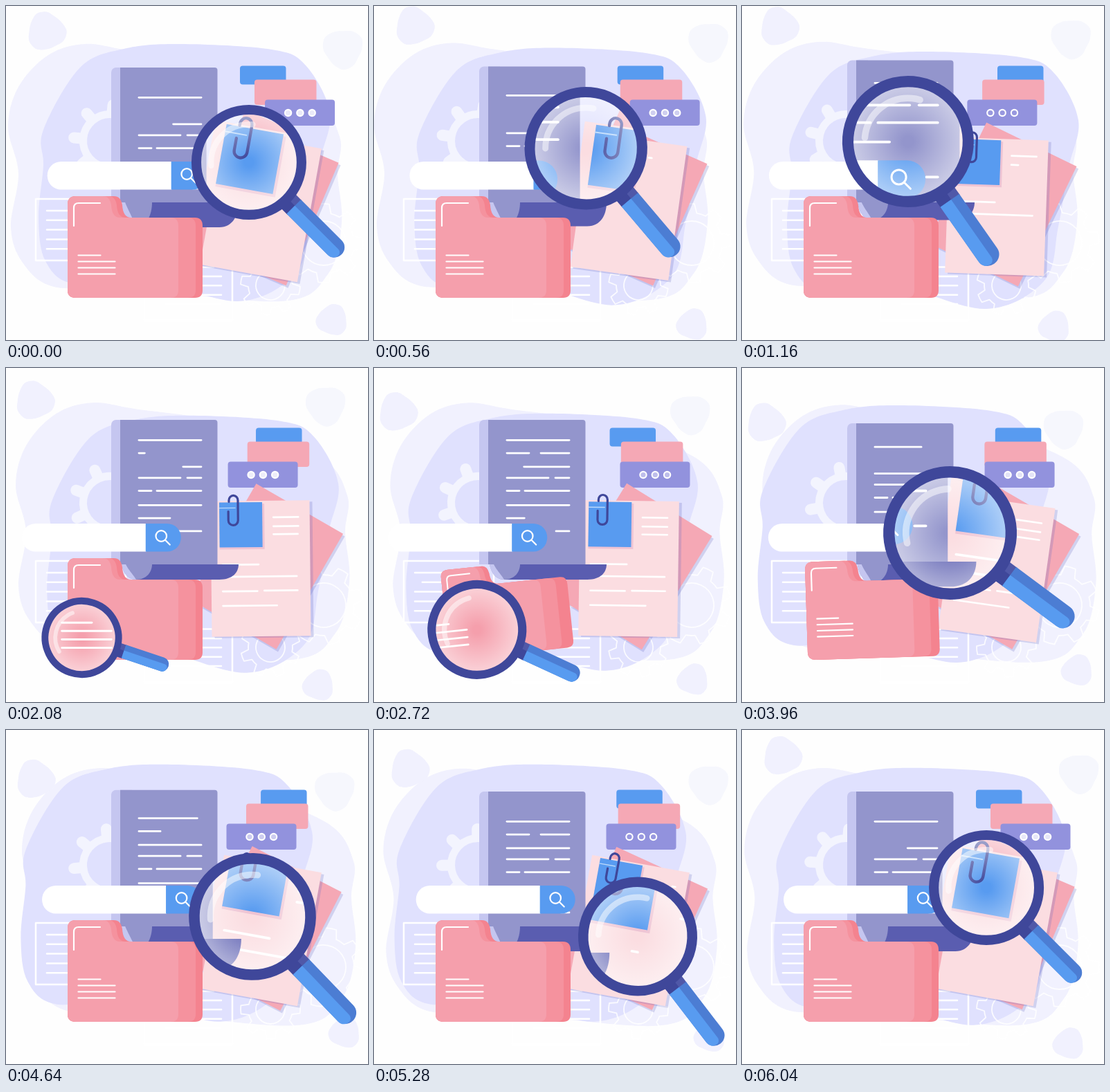
An HTML page with a canvas that plays this animation: 523x483 px, repeating every 6.08 s.

```html
<!DOCTYPE html>
<html lang="en">
<head>
<meta charset="utf-8">
<title>Document search</title>
<style>
html, body { margin: 0; width: 100%; height: 100%; overflow: hidden; background: #fefefe; }
canvas { display: block; }
</style>
</head>
<body>
<canvas id="stage" width="523" height="483"></canvas>
<script>
const g = document.getElementById('stage').getContext('2d');
const LOOP = 6080, TAU = Math.PI * 2, RAD = Math.PI / 180;
const BLUE = '#589bf0', NAVY = '#3f479a', PAGE = '#9395cc', LILAC = '#c5c6f0', PINK = '#f5a8b5';
let t = 0;

// Timing rules: an eased step, a step out and back, and a looping cosine.
const clamp = v => Math.min(1, Math.max(0, v));
function rise(from, to, time = t) {
  const u = clamp((time - from) / (to - from));
  return u * u * (3 - 2 * u);
}
const swing = (a, b, c, d, time) => rise(a, b, time) - rise(c, d, time);
const wave = (deg, turns = 1) => Math.cos(TAU * turns * t / LOOP + deg * RAD);

// Smooth looping curve through one column of the stops, flat at extremes.
function follow(stops, col) {
  const n = stops.length;
  const time = i => stops[(i + n) % n][0] + Math.floor(i / n) * LOOP;
  const val = i => stops[(i + n) % n][col];
  const slope = i => (val(i + 1) - val(i)) / (time(i + 1) - time(i));
  const tangent = i => {
    const a = slope(i - 1), b = slope(i);
    return a * b <= 0 ? 0 : 2 * a * b / (a + b);
  };
  let i = 0;
  while (i < n - 1 && t >= time(i + 1)) i++;
  const h = time(i + 1) - time(i), u = (t - time(i)) / h;
  return val(i) + (val(i + 1) - val(i)) * u * u * (3 - 2 * u) +
    h * (tangent(i) * u * (1 - u) ** 2 - tangent(i + 1) * u * u * (1 - u));
}

function box(x, y, w, h, r, color) {
  g.fillStyle = color;
  g.beginPath();
  g.roundRect(x, y, w, h, r);
  g.fill();
}

function dot(x, y, r, color) {
  g.fillStyle = color;
  g.beginPath();
  g.arc(x, y, r, 0, TAU);
  g.fill();
}

function pen(width, color = '#fff') {
  g.lineWidth = width;
  g.strokeStyle = color;
  g.lineCap = g.lineJoin = 'round';
}

function seg(x, y, w) {
  if (w < 1) return;
  g.beginPath();
  g.moveTo(x, y);
  g.lineTo(x + w, y);
  g.stroke();
}

function shape(d, color) {
  g.fillStyle = color;
  g.fill(new Path2D(d));
}

function turned(x, y, deg, draw, size = 1) {
  g.save();
  g.translate(x, y);
  g.rotate(deg * RAD);
  g.scale(size, size);
  draw();
  g.restore();
}

// Closed smooth outline that drifts on an ellipse.
function blob(color, pts, [xc, xs, yc, ys]) {
  const c = wave(0), s = wave(-90), n = pts.length;
  const at = i => pts[(i + n) % n];
  g.save();
  g.translate(xc * c + xs * s, yc * c + ys * s);
  g.beginPath();
  g.moveTo(...pts[0]);
  for (let i = 0; i < n; i++) {
    const [a, b, d, e] = [at(i - 1), at(i), at(i + 1), at(i + 2)];
    g.bezierCurveTo(b[0] + (d[0] - a[0]) / 6, b[1] + (d[1] - a[1]) / 6,
      d[0] - (e[0] - b[0]) / 6, d[1] - (e[1] - b[1]) / 6, ...d);
  }
  g.fillStyle = color;
  g.fill();
  g.restore();
}

function pebble(color, x, y, r, tip, drift) {
  const pts = Array.from({ length: 12 }, (_, i) => {
    const a = i * TAU / 12, d = r * (1 + .1 * Math.cos(3 * (a - tip * RAD)) + .04 * Math.cos(a - tip * RAD));
    return [x + d * Math.cos(a), y + d * Math.sin(a)];
  });
  blob(color, pts, drift);
}

const outline = s => s.split(' ').map(p => p.split(',').map(Number));
const outer = outline('15,173 30,115 73,69 126,53 188,62 320,82 454,131 494,187 491,241 497,312 477,386 409,425 180,405 81,404 36,369 19,318 30,240');
const inner = outline('50,183 103,93 166,66 247,59 380,67 429,90 464,158 450,227 435,312 415,390 331,431 200,398 95,406 53,373 43,310 50,235');

function gearOutline(x, y, rim, tip, hub, deg) {
  turned(x, y, deg, () => {
    pen(1.8, 'rgba(255,255,255,.85)');
    g.beginPath();
    for (let i = 0; i < 8; i++) {
      const a = i * TAU / 8;
      g.arc(0, 0, tip, a - .14, a + .14);
      g.arc(0, 0, rim, a + .24, a + .545);
    }
    g.closePath();
    g.moveTo(hub, 0);
    g.arc(0, 0, hub, 0, TAU);
    g.stroke();
  });
}

function backdrop() {
  blob('#f1f1fe', outer, [-12, -9, 2, -2]);
  blob('#e0e1fe', inner, [4, 22, -4, 9]);
  pebble('#f1f1fe', 46, 53, 27, 130, [13, 4, -17, -19]);
  pebble('#f6f7fd', 473, 68, 28, 205, [15, -2, -6, -20]);
  pebble('#f1f1fe', 469, 451, 22, -70, [2, -20, 4, 13]);

  const spin = 45 * t / LOOP;
  turned(150, 195, spin + 5, () => {
    pen(11, '#f3f4fe');
    g.beginPath();
    g.arc(0, 0, 38.5, 0, TAU);
    g.stroke();
    for (let i = 0; i < 8; i++) {
      g.rotate(TAU / 8);
      box(38, -8, 22, 16, [0, 8, 8, 0], '#f3f4fe');
    }
  });
  gearOutline(459, 343, 44, 57, 32, -spin);
  gearOutline(382, 404, 32, 43, 21, spin + 10);

  pen(2.5);
  g.strokeRect(43, 279, 130, 89);
  const indent = 24 * swing(2300, 3200, 3400, 3900);
  for (let i = 0; i < 5; i++) {
    const skip = i == 1 ? indent : 0;
    seg(59 + skip, 296 + i * 13.8, 70 - skip);
  }
  g.strokeRect(200, 345, 127, 110);
  for (let i = 0; i < 5; i++) seg(230, 377.5 + i * 13.4, i ? 81 : 70);
}

// Each card slides aside twice per loop, the lower ones later.
function callouts() {
  const slide = lag => {
    const time = (t - lag + LOOP) % LOOP;
    return swing(100, 1100, 1650, 2950, time) + swing(3320, 4120, 4500, 5870, time);
  };
  box(338 + 31 * slide(0), 86.5, 66.5, 27, 4, BLUE);
  box(359 - 12 * slide(120), 106.5, 89.5, 36.5, 4, PINK);
  const x = 374.5 - 56 * slide(280);
  box(x, 135.5, 101, 37.5, 4, '#9292dd');
  for (let i = 0; i < 3; i++) {
    dot(x + 33.5 + i * 17.3, 154.5, 5.7, '#fff');
    dot(x + 33.5 + i * 17.3, 154.5, 3.6, `rgba(146,146,221,${.55 + .4 * wave(-206, 3)})`);
  }
}

// Rows of writing: x, y, width, turn in the order of writing.
const rows = [
  [387, 216, 36, 0], [387, 229, 36, 1], [387, 240.5, 36, 2],
  [313, 284, 52, 0], [313, 301.5, 107, 0],
  [313, 322.5, 50, 1.5], [373, 322, 48, 1.5], [313, 343.5, 80, 2]
];

function papers() {
  const sheet = (w, h, color) => {
    box(4 - w / 2, 2 - h / 2, w, h, 0, 'rgba(100,105,190,.24)');
    box(-w / 2, -h / 2, w, h, 0, color);
  };
  turned(376, 287, 27.6 - 4.4 * wave(0), () => sheet(145, 193, PINK));
  turned(368, 290, 10.3 - 10.9 * swing(100, 1650, 2150, 4700), () => {
    sheet(143, 196, '#fbdde1');
    g.translate(-368, -290);
    pen(2.7);
    // Written from the left, later wiped toward the right.
    for (const [x, y, w, turn] of rows) {
      const on = 400 + 500 * turn, off = 4500 + 150 * turn;
      const len = w * swing(on, on + 750, off, off + 1000);
      seg(t > 4000 ? x + w - len : x, y, len);
    }
    box(309, 196, 65, 66, 0, '#eec3d3');
    box(309, 194, 62, 65, 0, BLUE);
    pen(1.4, '#b9d8fb');
    seg(309, 202, 23);
    pen(3.2, NAVY);
    g.stroke(new Path2D('M322 207V220a7 7 0 0 0 14 0V191a6.5 7 0 0 0 -13 0V193'));
  });
}

function scroll() {
  const lift = 14 * swing(300, 1580, 3160, 5160);
  const top = 89 - lift, end = top + 231, mid = (284 + end) / 2;
  box(152, top, 30, 284 - top, [7, 0, 0, 0], LILAC);
  shape(`M185 ${end}H308C328 ${end} 336 ${mid} 336 284H185Z`, '#5a5db0');
  shape(`M165 262C165 290 172 ${end} 188 ${end}C203 ${end} 211 ${mid} 211 284Z`, PAGE);
  shape(`M165 262C165 290 172 ${end} 188 ${end}C182 ${mid} 172 290 165 262Z`, LILAC);
  box(165, top, 140.5, 284 - top, [0, 4, 0, 0], PAGE);

  const line = (row, x, w) => seg(x, 132.3 - 2 * lift + row * 18.8, w);
  const ending = (row, w) => line(row, 282 - w, w);
  const second = swing(1900, 2700, 3500, 3900) + swing(4200, 5100, 5500, 6000);
  pen(2.8);
  line(0, 192, 90 - 23 * swing(3500, 3960, 4100, 4900));
  line(1, 192, 32 * clamp(2 * second));
  line(1, 241, 41 * clamp(2 * second - 1));
  ending(2.05, 90 * clamp(.7 + .7 * wave(-249)));
  line(2.9, 192, 60);
  ending(2.9, 20);
  line(3.9, 192, 18);
  ending(3.9, 64);
  line(5, 192, 90 * swing(800, 1600, 5000, 6080));
  line(6, 192, 45 * swing(1650, 2080, 2400, 3100));
  ending(7, 12 + 20 * swing(1100, 1950, 2300, 3000));
}

function searchBar() {
  const x = 41 + 21 * wave(27);
  box(x, 225, 180, 40.5, [20, 0, 0, 20], '#fff');
  box(x + 179, 225, 51, 40.5, [0, 20, 20, 0], BLUE);
  pen(2.2);
  g.beginPath();
  g.arc(x + 201.5, 243, 7.8, 0, TAU);
  g.moveTo(x + 207.5, 249);
  g.lineTo(x + 214, 255.5);
  g.stroke();
}

function folder() {
  const panel = (tab, right, color) => shape(
    `M89 287Q89 275 101 275H${tab - 10}Q${tab} 275 ${tab + 2} 288Q${tab + 3} 306 ${tab + 15} 306` +
    `H${right - 11}Q${right} 306 ${right} 318V411Q${right} 422 ${right - 11} 422H101Q89 422 89 411Z`, color);
  const tilt = swing(2100, 3150, 3350, 4200);
  turned(187 + 3 * tilt, 348.5, -9.5 * tilt, () => {
    g.translate(-187, -348.5);
    panel(166, 284 + 14 * tilt, '#f4838f');
    panel(158, 274, '#f5929e');
    panel(150, 249, '#f59fac');
    pen(2.2);
    g.stroke(new Path2D('M98 318V292Q98 285 105 285H136'));
    for (let i = 0; i < 4; i++) seg(104.5, 360.5 + i * 9, i ? 53 : 32);
  }, 1 - .18 * tilt);
}

function scene() {
  backdrop();
  callouts();
  papers();
  scroll();
  searchBar();
  folder();
}

// Where the magnifier rests: time, x, y, radius, handle angle, shift of the view.
const stops = [
  [0, 351, 226, 83, 45, 0, 0],
  [1160, 240, 196, 95, 55, -14, -12],
  [2080, 109.5, 390, 58, 18.5, -22, 18],
  [3320, 216, 352, 88.5, 32.8, -46, 0],
  [3960, 300.5, 238.5, 96.5, 36.6, -10, -20],
  [5280, 381, 298.5, 86, 52.5, 20, 43]
];

function magnifier() {
  const [x, y, r, deg, dx, dy] = [1, 2, 3, 4, 5, 6].map(col => follow(stops, col));

  g.save();
  g.beginPath();
  g.arc(x, y, r * .9, 0, TAU);
  g.clip();
  g.fillStyle = '#fefefe';
  g.fillRect(0, 0, 523, 483);
  g.translate(x + dx, y + dy);
  g.scale(1.35, 1.35);
  g.translate(-x, -y);
  scene();
  g.restore();

  const glass = g.createRadialGradient(x, y, r * .08, x, y, r * .88);
  glass.addColorStop(0, 'rgba(255,255,255,0)');
  glass.addColorStop(1, 'rgba(255,255,255,.54)');
  dot(x, y, r * .9, glass);

  turned(x, y, deg, () => {
    pen(.1, 'rgba(255,255,255,.5)');
    g.beginPath();
    g.arc(0, 0, .66, 130 * RAD, 231 * RAD);
    g.stroke();
    box(.96, -.18, .16, .35, 0, '#5058a8');
    box(.96, -.03, .16, .2, 0, NAVY);
    box(1.1, -.18, 1.175, .35, [0, .17, .17, 0], '#4c7dd3');
    box(1.1, -.03, 1.15, .2, [0, .1, .15, 0], BLUE);
    pen(.17, NAVY);
    g.beginPath();
    g.arc(0, 0, .915, 0, TAU);
    g.stroke();
  }, r);
}

const start = performance.now();
function frame(now) {
  t = Math.max(0, now - start) % LOOP;
  g.fillStyle = '#fefefe';
  g.fillRect(0, 0, 523, 483);
  scene();
  magnifier();
  requestAnimationFrame(frame);
}
frame(start);
</script>
</body>
</html>
```
